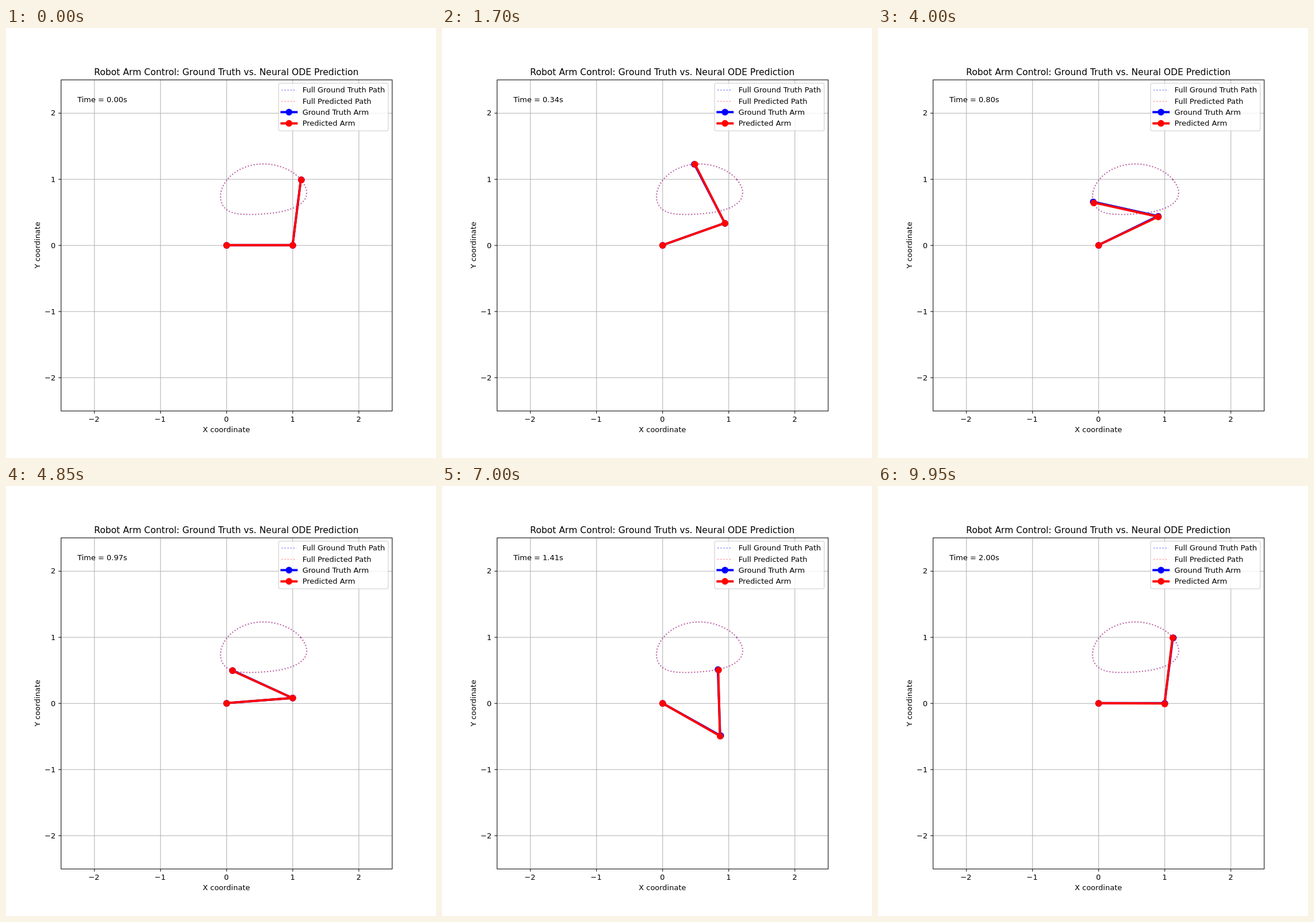
Animation, 748 px wide and 748 px high, one loop 10 s. Source, as an HTML page with a canvas:

```html
<!DOCTYPE html>
<html lang="en">
<head>
<meta charset="utf-8">
<title>Robot Arm Control</title>
<style>
html, body { margin: 0; width: 100%; height: 100%; overflow: hidden; background: #fff; }
canvas { display: block; }
</style>
</head>
<body>
<canvas id="c" width="748" height="748"></canvas>
<script>
const ctx = document.getElementById('c').getContext('2d');

// The figure is laid out on an 800-unit square at 100 dpi.
const SCALE = 748 / 800, PT = 100 / 72, EM = 10 * PT;
const UNIT = 123.2, CX = 410, CY = 404;
const BOX = { l: 102, r: 718, t: 96, b: 712 };
const STEPS = 200, STEP_MS = 50, SPAN = 2;
const BLUE = '#0000ff', RED = '#ff0000';

// Model error at some moments: time, shoulder and elbow offset in radians.
const DRIFT = [
  [0, 0, 0], [0.342, -0.002, -0.006], [0.804, -0.010, 0.010], [1.156, 0.010, -0.002],
  [1.407, -0.008, -0.003], [1.719, 0, 0], [2, -0.005, 0.011]
];

const px = x => CX + x * UNIT;
const py = y => CY - y * UNIT;
const snap = v => Math.floor(v + 0.5) + 0.5;

function drift(t) {
  let i = 1;
  while (i < DRIFT.length - 1 && DRIFT[i][0] < t) i++;
  const a = DRIFT[i - 1], b = DRIFT[i];
  const u = (t - a[0]) / (b[0] - a[0]);
  const k = (1 - Math.cos(Math.PI * u)) / 2;
  return [a[1] + (b[1] - a[1]) * k, a[2] + (b[2] - a[2]) * k];
}

// Joint positions of the two unit links; the elbow angle tracks a circular target.
function pose(t, predicted) {
  const c = Math.cos(Math.PI * t), s = Math.sin(Math.PI * t);
  const [d1, d2] = predicted ? drift(t) : [0, 0];
  const q1 = Math.atan2(0.5 * s, 1 + 0.5 * c) + d1;
  const q2 = Math.acos((c - 0.75) / 2) + d2;
  const ex = Math.cos(q1), ey = Math.sin(q1);
  return [[0, 0], [ex, ey], [ex + Math.cos(q1 + q2), ey + Math.sin(q1 + q2)]]
    .map(([x, y]) => [px(x), py(y)]);
}

const timeAt = i => i * SPAN / (STEPS - 1);
const tipPath = predicted => Array.from({ length: STEPS }, (_, i) => pose(timeAt(i), predicted)[2]);
const truePath = tipPath(false), predPath = tipPath(true);

function line(pts, color, width) {
  ctx.strokeStyle = color;
  ctx.lineWidth = width;
  ctx.beginPath();
  pts.forEach(p => ctx.lineTo(p[0], p[1]));
  ctx.stroke();
}

function dotted(pts, color) {
  const w = 1.5 * PT;
  ctx.save();
  ctx.globalAlpha = 0.4;
  ctx.lineJoin = 'round';
  ctx.setLineDash([w, 1.65 * w]);
  line(pts, color, w);
  ctx.restore();
}

function dot([x, y], color) {
  ctx.fillStyle = color;
  ctx.beginPath();
  ctx.arc(snap(x), snap(y), 4.5 * PT, 0, 2 * Math.PI);
  ctx.fill();
}

function arm(pts, color, dots = pts) {
  ctx.save();
  ctx.lineCap = 'square';
  ctx.lineJoin = 'round';
  line(pts, color, 3 * PT);
  dots.forEach(p => dot(p, color));
  ctx.restore();
}

function text(str, x, y, align = 'left', size = EM) {
  ctx.font = `${size}px "DejaVu Sans", sans-serif`;
  ctx.textAlign = align;
  ctx.fillStyle = '#000';
  ctx.fillText(str, x, y);
}

function grid() {
  for (let v = -2; v <= 2; v++) {
    const x = snap(px(v)), y = snap(py(v));
    line([[x, BOX.t], [x, BOX.b]], '#b0b0b0', 0.8 * PT);
    line([[BOX.l, y], [BOX.r, y]], '#b0b0b0', 0.8 * PT);
  }
}

function axes() {
  const w = 0.8 * PT, tick = 3.5 * PT;
  for (let v = -2; v <= 2; v++) {
    const x = snap(px(v)), y = snap(py(v));
    const label = String(v).replace('-', '\u2212');
    line([[x, BOX.b + 0.5], [x, BOX.b + 0.5 + tick]], '#000', w);
    line([[BOX.l + 0.5, y], [BOX.l + 0.5 - tick, y]], '#000', w);
    text(label, px(v), 733, 'center');
    text(label, BOX.l - 2 * tick, py(v) + 5.4, 'right');
  }
  ctx.strokeStyle = '#000';
  ctx.lineWidth = w;
  ctx.strokeRect(BOX.l + 0.5, BOX.t + 0.5, BOX.r - BOX.l, BOX.b - BOX.t);

  text('Robot Arm Control: Ground Truth vs. Neural ODE Prediction', CX, 88, 'center', 12 * PT);
  text('X coordinate', CX, 752, 'center');
  ctx.save();
  ctx.translate(63, CY);
  ctx.rotate(-Math.PI / 2);
  text('Y coordinate', 0, 0, 'center');
  ctx.restore();
}

function legend() {
  ctx.save();
  ctx.globalAlpha = 0.8;
  ctx.fillStyle = '#fff';
  ctx.strokeStyle = '#ccc';
  ctx.lineWidth = PT;
  ctx.beginPath();
  ctx.roundRect(507.2, 102.9, 203.9, 88.4, 2.8);
  ctx.fill();
  ctx.stroke();
  ctx.restore();

  const rows = [
    ['Full Ground Truth Path', BLUE, false], ['Full Predicted Path', RED, false],
    ['Ground Truth Arm', BLUE, true], ['Predicted Arm', RED, true]
  ];
  rows.forEach(([label, color, solid], i) => {
    const base = Math.round(120 + 20.7 * i), y = base - 4.5;
    const pts = [[512.7, y], [540.5, y]];
    if (solid) arm(pts, color, [[526.3, y - 0.5]]);
    else dotted(pts, color);
    text(label, 551.5, base);
  });
}

function draw(i) {
  const t = timeAt(i);
  ctx.setTransform(1, 0, 0, 1, 0, 0);
  ctx.fillStyle = '#fff';
  ctx.fillRect(0, 0, 748, 748);
  ctx.scale(SCALE, SCALE);
  grid();
  dotted(truePath, BLUE);
  dotted(predPath, RED);
  arm(pose(t, false), BLUE);
  arm(pose(t, true), RED);
  axes();
  text(`Time = ${t.toFixed(2)}s`, 132.8, 138.5);
  legend();
}

const start = performance.now();
let shown = -1;
function tick() {
  const i = Math.floor((performance.now() - start) / STEP_MS) % STEPS;
  if (i !== shown) draw(shown = i);
  requestAnimationFrame(tick);
}
tick();
</script>
</body>
</html>
```
